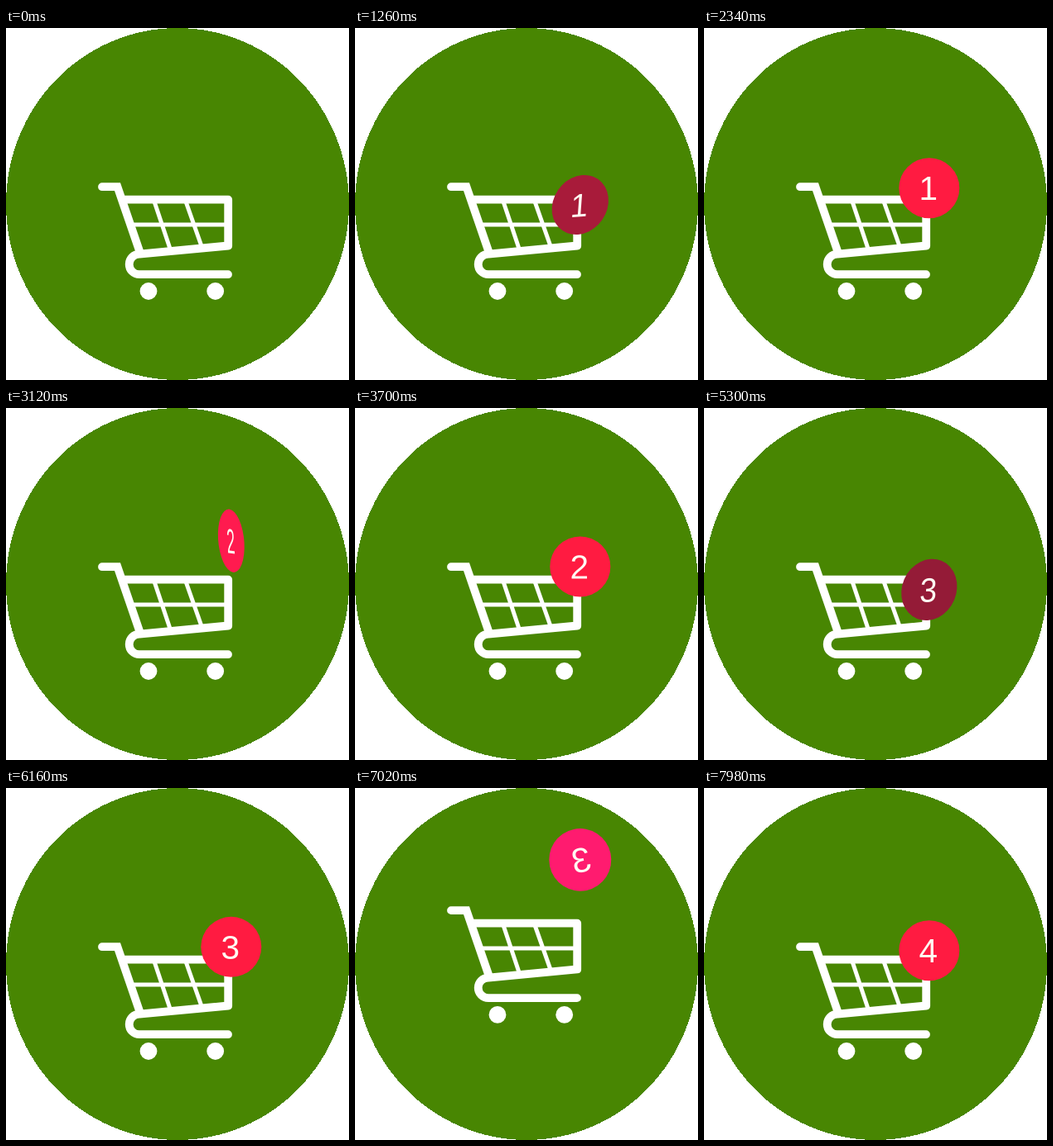
Animation, 414 px wide and 426 px high, one loop 8000 ms. Source, as an HTML page:

```html
<!DOCTYPE html>
<html lang="en">
<head>
<meta charset="utf-8">
<title>Cart counter</title>
<style>
  html, body { margin: 0; width: 100%; height: 100%; overflow: hidden; background: #fff; }
  svg { display: block; width: 100%; height: 100%; }
  #cart path { fill: none; stroke: #fff; stroke-width: 9.8; }
  #cart .grid { stroke-width: 5; }
  #cart circle { fill: #fff; }
  text { font: 40.5px "Liberation Sans", Arial, sans-serif; fill: #fffaf2; text-anchor: middle; }
</style>
</head>
<body>
<svg viewBox="0 0 414 426">
  <ellipse cx="207" cy="213" rx="207" ry="213" fill="#488602" shape-rendering="crispEdges"/>
  <g id="cart">
    <path d="M116 192.2H134.5L161.5 271" stroke-linecap="round"/>
    <path d="M143 207.7H268.2V263.5L161 273.6A12.3 12.3 0 0 0 161 298.2H268" stroke-linecap="round" stroke-linejoin="round"/>
    <path class="grid" d="M150 238H266M179 210L198 267M217 210L236 264"/>
    <circle cx="172" cy="318.5" r="10.4"/>
    <circle cx="252.7" cy="318.5" r="10.4"/>
  </g>
  <g id="badge">
    <circle id="disc" r="36.5"/>
    <text id="digit" x="-1" y="14.5"></text>
  </g>
</svg>
<script>
const LOOP = 8000, START = 670, PERIOD = 2045;
const JUMP = 400, PEAK = 240, LAND = 545, SPIN = 465;
const REST = 193.5, TOP = 84, LOW = 220;
const RAD = Math.PI / 180, BOUNCE = Math.PI / 310;

const $ = id => document.getElementById(id);
const cart = $('cart'), badge = $('badge'), disc = $('disc'), digit = $('digit');

const clamp = (v, lo, hi) => Math.min(hi, Math.max(lo, v));
const glide = (a, b, u) => a + (b - a) * (1 - Math.cos(Math.PI * u)) / 2;

// Tossed up, falls below its resting place, then bobs until still.
function height(t) {
  if (t < PEAK) return glide(REST, TOP, t / PEAK);
  if (t < LAND) return glide(TOP, LOW, (t - PEAK) / (LAND - PEAK));
  const s = t - LAND;
  return REST + (LOW - REST) * Math.exp(-0.0033 * s) * Math.cos(BOUNCE * s);
}

// One full turn, then a damped wobble around the front.
function turn(t) {
  const u = t / SPIN, s = t - SPIN;
  return s < 0
    ? 360 * u + 27 * Math.sin(2 * Math.PI * u)
    : 360 + 70 * Math.exp(-0.006 * s) * Math.sin(BOUNCE * s);
}

// The back is pinker; a side turned from the light is darker.
function shade(angle, tilt) {
  const away = Math.sin(angle * RAD) * Math.cos(tilt * RAD);
  const loss = clamp(520 * (away - 0.26), 0, 120);
  const blue = 65 + 23 * (1 - Math.cos(angle * RAD)) - loss * 0.12;
  return `rgb(${Math.round(255 - loss)},27,${Math.round(blue)})`;
}

function draw(t) {
  const started = t >= START;
  const n = Math.floor((t - START) / PERIOD);
  const ph = started ? (t - START) % PERIOD : 0;

  const u = Math.min(ph / JUMP, 1);
  cart.setAttribute('transform', `translate(0 ${-4 * 44.3 * u * (1 - u)})`);

  badge.style.display = started ? '' : 'none';
  if (!started) return;
  const angle = turn(ph), tilt = clamp(0.22 * (ph - 430), -6, 45);
  const near = 1 + 0.05 * Math.exp(-(((ph - 400) / 320) ** 2));
  const size = near * (n ? 1 : Math.min(ph / 180, 1));
  badge.setAttribute('transform', `translate(271.8 ${height(ph)}) rotate(${tilt}) `
    + `scale(${size * Math.cos(angle * RAD)} ${size}) rotate(${-tilt})`);
  disc.setAttribute('fill', shade(angle, tilt));
  digit.textContent = n && angle < 270 ? n : n + 1;
}

let origin;
function tick(now) {
  origin ??= now;
  draw((now - origin) % LOOP);
  requestAnimationFrame(tick);
}
draw(0);
requestAnimationFrame(tick);
</script>
</body>
</html>
```
